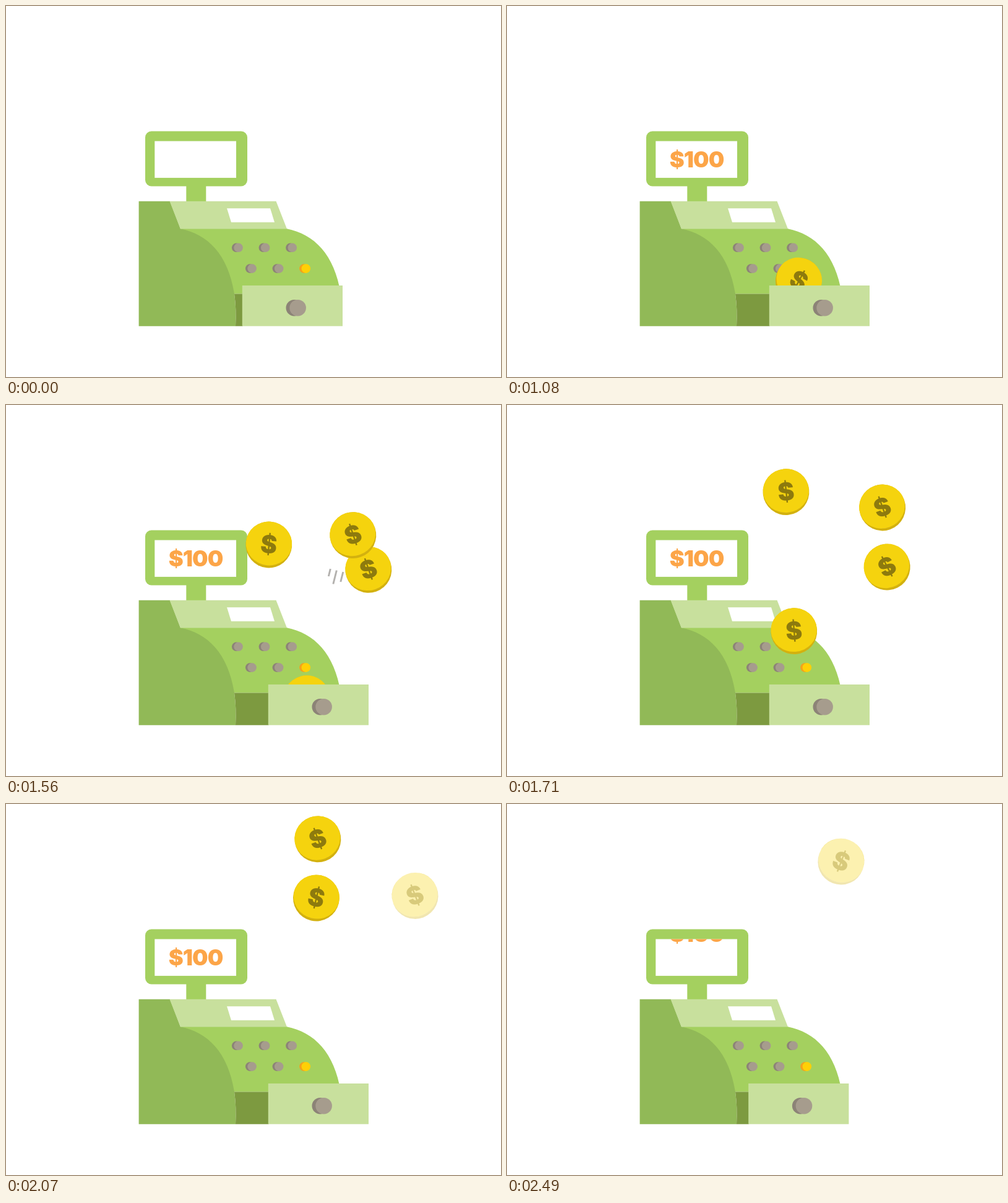
Animation, 800 px wide and 600 px high, one loop 2.52 s. Source, as an HTML page with a canvas:

```html
<!DOCTYPE html>
<html lang="en">
<head>
<meta charset="utf-8">
<title>Cash register</title>
<style>
  html, body { margin: 0; width: 100%; height: 100%; overflow: hidden; background: #fff; }
  canvas { display: block; width: 800px; height: 600px; }
</style>
</head>
<body>
<canvas id="stage" width="800" height="600"></canvas>
<script>
const ctx = document.getElementById('stage').getContext('2d');
const LOOP = 2520, COIN_LIFE = 1000, COIN_FADE = 95;
const FONT = 'Inter, Lato, "Open Sans", sans-serif';
const GREEN = '#a4d05f', SHADE = '#91b957', LIGHT = '#c8e09d', INSIDE = '#7d9a40';
const GREY = '#a69c8d', GREY_DARK = '#8c8377', ORANGE = '#fca548';
const SCREEN = [240.3, 218.5, 131.7, 59.4];

// Each coin flies along a cubic Bezier path while turning between two angles.
const coins = [
  { start: 1014, spin: [38, -34], path: [[483, 488], [430, 380], [565, 230], [635, 268]] },
  { start: 1102, spin: [-12, -21], path: [[480, 496], [429, 458], [539, 142], [661.5, 148.5]] },
  { start: 1190, spin: [45, -21], path: [[490, 496], [367, 430], [411, 142], [508, 53]] },
  { start: 1522, spin: [-18, 21], path: [[500, 496], [431, 417], [469, 154], [540, 93]] }
];

// Inner ends of the rays, from left over the top to right.
const rayEnds = [[210, 247], [235.5, 193], [307.7, 184.5], [375, 193], [401, 241.7]];

const clamp = v => Math.min(1, Math.max(0, v));
const progress = (t, from, to) => clamp((t - from) / (to - from));
const mix = (a, b, p) => a + (b - a) * p;
const sine = p => (1 - Math.cos(Math.PI * p)) / 2;
const easeOut = (p, power) => 1 - (1 - p) ** power;
const closing = t => sine(progress(t, 2350, 2550));

function fillRect(color, ...box) {
  ctx.fillStyle = color;
  ctx.fillRect(...box);
}

function fillPoly(color, ...points) {
  ctx.fillStyle = color;
  ctx.beginPath();
  points.forEach(point => ctx.lineTo(...point));
  ctx.fill();
}

function disc(color, x, y, r) {
  ctx.fillStyle = color;
  ctx.beginPath();
  ctx.arc(x, y, r, 0, Math.PI * 2);
  ctx.fill();
}

function line(x1, y1, x2, y2) {
  ctx.beginPath();
  ctx.moveTo(x1, y1);
  ctx.lineTo(x2, y2);
  ctx.stroke();
}

function label(text, x, y, size, color) {
  ctx.font = `900 ${size}px ${FONT}`;
  ctx.letterSpacing = text.length > 1 ? '-1px' : '0px';
  ctx.textAlign = 'center';
  ctx.fillStyle = color;
  ctx.fillText(text, x, y);
}

function withClip(box, paint) {
  ctx.save();
  ctx.beginPath();
  ctx.rect(...box);
  ctx.clip();
  paint();
  ctx.restore();
}

function knob(x, y, r, gap, face = GREY, shadow = GREY_DARK) {
  disc(shadow, x - gap / 2, y, r);
  disc(face, x + gap / 2, y, r);
}

function drawDisplay(t) {
  ctx.fillStyle = GREEN;
  ctx.beginPath();
  ctx.roundRect(225, 202.6, 165, 88.8, 10);
  ctx.fill();
  fillRect(GREEN, 291.3, 290, 32, 27);
  fillRect('#fff', ...SCREEN);
  const shift = 48 * (1 - easeOut(progress(t, 140, 420), 3) - closing(t));
  withClip(SCREEN, () => label('$100', 306.5, 261.4 + shift, 36, ORANGE));
}

function drawRays(t) {
  const shift = (t - 570) * .27;
  ctx.strokeStyle = ORANGE;
  ctx.lineWidth = 4;
  ctx.lineCap = 'round';
  rayEnds.forEach(([x, y], i) => {
    const angle = Math.PI * (1 + i / 4), dx = Math.cos(angle), dy = Math.sin(angle);
    const longFirst = i === 2 || i === 3;
    const dashes = longFirst ? [[0, 24.5], [33.5, 39]] : [[0, 5.5], [14.5, 39]];
    for (const dash of dashes) {
      const [a, b] = dash.map(u => 46 * clamp((u + shift) / 46));
      if (b > a) line(x + dx * a, y + dy * a, x + dx * b, y + dy * b);
    }
  });
}

// The front and the side of the register share one curved edge.
function curvedPanel(color, left, top, right) {
  ctx.fillStyle = color;
  ctx.beginPath();
  ctx.moveTo(left, top);
  ctx.lineTo(right - 17, top);
  ctx.lineTo(right, 360.3);
  ctx.bezierCurveTo(right + 44, 369, right + 77, 402, right + 87, 465.6);
}

function drawBody() {
  curvedPanel(GREEN, 282, 350, 454);
  ctx.lineTo(282, 465.6);
  ctx.fill();

  curvedPanel(SHADE, 214.6, 315.8, 282);
  ctx.bezierCurveTo(371.5, 483, 372, 500, 371, 517.7);
  ctx.lineTo(214.6, 517.7);
  ctx.fill();

  fillPoly(LIGHT, [264.5, 315.8], [436.5, 315.8], [454, 360.5], [282, 360.5]);
  fillPoly('#fff', [357, 327.3], [427, 327.3], [434, 349.8], [364, 349.8]);

  for (let i = 0; i < 3; i++) {
    knob(373.9 + 43.6 * i, 390.8, 7.3, 3.4);
    knob(395.9 + 43.6 * i, 424.6, 7.3, 3.4, ...(i === 2 ? ['#ffd006', '#f3a11c'] : []));
  }
}

function drawDrawer(t) {
  const x = 381.8 + 42 * (sine(progress(t, 690, 1000)) - closing(t));
  ctx.fillStyle = INSIDE;
  ctx.beginPath();
  ctx.moveTo(369, 465.6);
  ctx.bezierCurveTo(371.5, 483, 372, 500, 371, 517.7);
  ctx.lineTo(x + 1, 517.7);
  ctx.lineTo(x + 1, 465.6);
  ctx.fill();
  fillRect(LIGHT, x, 452, 162.2, 65.7);
  knob(x + 86.9, 488.2, 13.3, 5.8);
}

function bezier(path, s) {
  if (path.length === 1) return path[0];
  const next = path.slice(1).map((point, i) => point.map((v, c) => mix(path[i][c], v, s)));
  return bezier(next, s);
}

function drawCoin({ start, spin, path }, t) {
  const age = t - start;
  if (age < 0 || age >= COIN_LIFE) return;
  const s = easeOut(age / COIN_LIFE, 2);
  const face = new Path2D(), rim = new Path2D();
  face.ellipse(0, -2, 37.2, 35.4, 0, 0, Math.PI * 2);
  rim.arc(0, 0, 37.4, 0, Math.PI * 2);
  ctx.save();
  ctx.globalAlpha = clamp((COIN_LIFE - age) / COIN_FADE);
  ctx.translate(...bezier(path, s));
  ctx.rotate(mix(...spin, s) * Math.PI / 180);
  if (ctx.globalAlpha < 1) rim.addPath(face); // keeps the rim from showing through
  ctx.fillStyle = '#d3b10f';
  ctx.fill(rim, 'evenodd');
  ctx.fillStyle = '#f5d30e';
  ctx.fill(face);
  label('$', 0, 13.5, 40, '#8d7a0e');
  ctx.restore();
}

function drawSpeedLines(t) {
  const from = sine(progress(t, 1590, 1680)), to = sine(progress(t, 1440, 1545));
  if (to <= from) return;
  ctx.strokeStyle = '#b3b1ae';
  ctx.lineWidth = 3;
  ctx.lineCap = 'butt';
  [[521.3, 277, 12], [528.8, 289.5, 22], [540.8, 286, 16]].forEach(([x, y, length]) =>
    line(x + length * from / 4, y - length * from, x + length * to / 4, y - length * to));
}

function draw(t) {
  fillRect('#fff', 0, 0, 800, 600);
  drawDisplay(t);
  drawRays(t);
  drawBody();
  withClip([0, 0, 800, 465.6], () => {
    drawSpeedLines(t);
    coins.forEach(coin => drawCoin(coin, t));
  });
  drawDrawer(t);
}

const begin = performance.now();
function tick() {
  draw((performance.now() - begin) % LOOP);
  requestAnimationFrame(tick);
}
tick();
</script>
</body>
</html>
```
